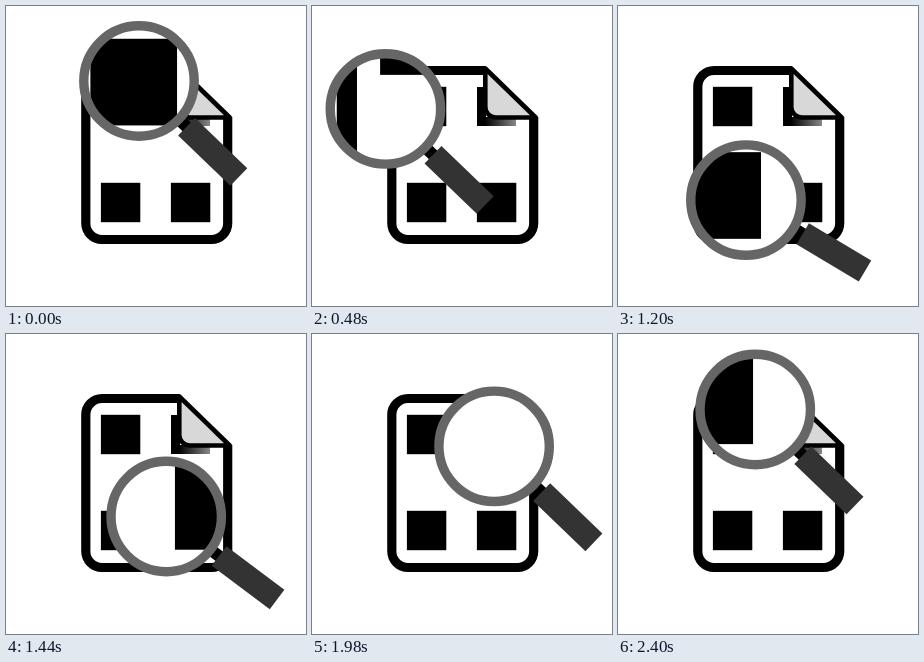
Write an HTML page that moves like this. It is 300x300 px and loops after 2.43 s.

```html
<!DOCTYPE html>
<html lang="en">
<head>
<meta charset="utf-8">
<title>Page scan</title>
<style>
  html, body { margin: 0; width: 100%; height: 100%; overflow: hidden; background: #fff; }
  svg { display: block; width: 100%; height: 100%; }
</style>
</head>
<body>
<svg viewBox="0 0 300 300">
  <defs>
    <linearGradient id="shade">
      <stop offset="0.2" stop-color="#000"/>
      <stop offset="1" stop-color="#888"/>
    </linearGradient>
    <clipPath id="glass"><circle r="52"/></clipPath>
    <rect id="tile" width="39.4" height="39.4"/>
    <g id="page">
      <path d="M173 64.5H96A16.2 16.2 0 0 0 79.8 80.7V217.3A16.2 16.2 0 0 0 96 233.5H205.5A16.2 16.2 0 0 0 221.7 217.3V111"
            fill="#fff" stroke="#000" stroke-width="9.2"/>
      <use href="#tile" x="94.9" y="80.8"/>
      <use href="#tile" x="94.9" y="176.8"/>
      <use href="#tile" x="164.9" y="176.8"/>
      <path d="M165 81H174V111H204V120H165Z" fill="url(#shade)"/>
      <path d="M173.3 62.5V101A10.5 10.5 0 0 0 183.8 111.5H223.7Z"
            fill="#d8d8d8" stroke="#000" stroke-width="4.6" stroke-linejoin="round"/>
    </g>
  </defs>
  <rect width="300" height="300" fill="#fff"/>
  <use href="#page"/>
  <g id="lens">
    <g id="handle">
      <rect x="56" y="-6" width="14" height="12"/>
      <rect x="66" y="-12.2" width="72.5" height="24.4" fill="#333"/>
    </g>
    <circle r="55.5" fill="#fff"/>
    <g clip-path="url(#glass)"><use id="zoom" href="#page"/></g>
    <circle r="55.2" fill="none" stroke="#666" stroke-width="9.4"/>
  </g>
</svg>
<script>
  const LOOP = 2430, STEP = 30, SCALE = 2.2;
  const get = id => document.getElementById(id);
  const lens = get('lens'), handle = get('handle'), zoom = get('zoom');

  // Points evenly spaced in time: the lens goes round a closed path,
  // the page point it shows follows an open one and cuts back.
  const orbit = [[133, 75], [94, 84], [70, 111], [70, 163], [110, 192],
                 [149, 189], [178, 163], [185, 125], [169, 90]];
  const view = [[117, 100], [99, 128], [98, 174], [129, 199],
                [182, 194], [181, 142], [131.5, 101.5]];

  // Smooth curve through the points, u from 0 to 1
  function curve(points, u, closed) {
    const n = points.length, pos = u * (closed ? n : n - 1);
    const i = Math.floor(pos), f = pos - i;
    const index = k => closed ? (k + n) % n : Math.min(Math.max(k, 0), n - 1);
    const slope = (k, axis) => {
      const span = !closed && (k === 0 || k === n - 1) ? 1 : 2;
      return (points[index(k + 1)][axis] - points[index(k - 1)][axis]) / span;
    };
    const blend = f * f * (3 - 2 * f);
    return [0, 1].map(axis =>
      (1 - blend) * points[index(i)][axis] + blend * points[index(i + 1)][axis]
      + f * (1 - f) * ((1 - f) * slope(i, axis) - f * slope(index(i + 1), axis)));
  }

  // The handle flattens while the lens sweeps along the bottom
  function tilt(t) {
    const d = Math.min(Math.abs(t - 1150) / 600, 1);
    return 43.9 - 6.7 * (1 + Math.cos(Math.PI * d));
  }

  function draw(ms) {
    const t = Math.floor((ms % LOOP) / STEP) * STEP;
    const [x, y] = curve(orbit, t / LOOP, true);
    const [px, py] = curve(view, t / LOOP, false);
    lens.setAttribute('transform', `translate(${x} ${y})`);
    handle.setAttribute('transform', `rotate(${tilt(t)})`);
    zoom.setAttribute('transform', `scale(${SCALE}) translate(${-px} ${-py})`);
  }

  let start;
  function tick(now) {
    start ??= now;
    draw(Math.max(0, now - start));
    requestAnimationFrame(tick);
  }
  draw(0);
  requestAnimationFrame(tick);
</script>
</body>
</html>
```
